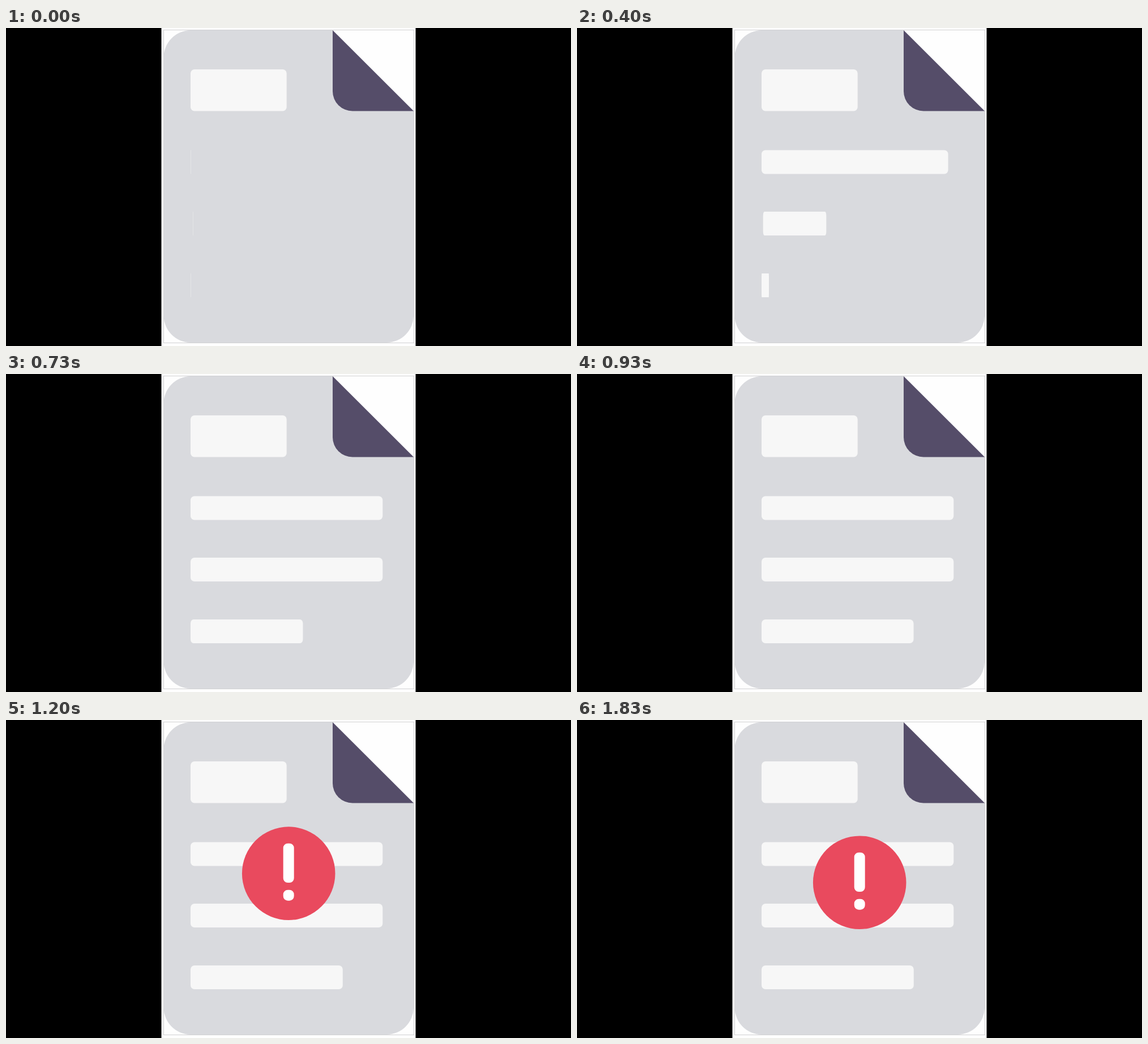
These frames come from a looping animation (998x561 px, 2.01 s). An HTML page:

```html
<!DOCTYPE html>
<html lang="en">
<head>
<meta charset="utf-8">
<title>Document alert</title>
<style>
  html, body { margin: 0; width: 100%; height: 100%; overflow: hidden; background: #000; }
  svg { display: block; width: 100%; height: 100%; }
</style>
</head>
<body>
<svg viewBox="0 0 998 561">
  <rect x="274.5" width="449" height="561" fill="#fefefe"/>
  <rect x="278.5" y="3.5" width="442" height="552" fill="none" stroke="#d0d0d2"/>
  <path fill="#d9dade" d="M326 4H577L720 146V507A48 48 0 0 1 672 555H326A48 48 0 0 1 278.5 507V52A48 48 0 0 1 326 4Z"/>
  <path fill="#554d69" d="M577 4L720 146.5H612A35 35 0 0 1 577 111.5Z"/>
  <g fill="#f7f7f7">
    <rect x="326" y="73" width="169.7" height="73.5" rx="7"/>
    <rect class="line" y="215.5" height="42" ry="7"/>
    <rect class="line" y="324" height="42" ry="7"/>
    <rect class="line" y="433" height="42" ry="7"/>
  </g>
  <g id="alert">
    <circle r="82.3" fill="#e94a5e"/>
    <rect x="-9.5" y="-53" width="19" height="69.3" rx="8" fill="#fff"/>
    <rect x="-9.5" y="29" width="19" height="19" rx="8" fill="#fff"/>
  </g>
</svg>
<script>
  const LOOP = 2010;
  // Times and durations are counted in steps of 1/30 s.
  const lines = [
    { from: 326, left: 326, right: 665.3, start: 4, duration: 8.9 },
    { from: 330, left: 326, right: 665.3, start: 7.7, duration: 11.2 },
    { from: 326, left: 326, right: 594.8, start: 9.5, duration: 18.8 }
  ];
  const bars = document.querySelectorAll('.line');
  const alertIcon = document.getElementById('alert');

  const mix = (a, b, p) => a + (b - a) * p;

  function ease(step, start, duration) {
    const p = Math.min(1, Math.max(0, (step - start) / duration));
    return p * p * (3 - 2 * p);
  }

  // Each 100 ms holds three steps, at 0, 30 and 70 ms.
  function stepAt(ms) {
    const rest = ms % 100;
    return 3 * Math.floor(ms / 100) + (rest >= 30) + (rest >= 70);
  }

  function draw(step) {
    lines.forEach((line, i) => {
      const p = ease(step, line.start, line.duration);
      const x = mix(line.from, line.left, p);
      bars[i].setAttribute('x', x);
      bars[i].setAttribute('width', Math.max(0.35, mix(line.from, line.right, p) - x));
      bars[i].setAttribute('rx', 7 * p);
    });

    const drop = mix(88, 304.5, ease(step, 30.9, 6.8));
    const y = drop - 17.8 * ease(step, 37.7, 3.3);
    alertIcon.setAttribute('transform', `translate(499.2 ${y})`);
    alertIcon.setAttribute('opacity', ease(step, 30.9, 4.9));
  }

  const origin = performance.now();
  function tick() {
    draw(stepAt((performance.now() - origin) % LOOP));
    requestAnimationFrame(tick);
  }
  tick();
</script>
</body>
</html>
```
